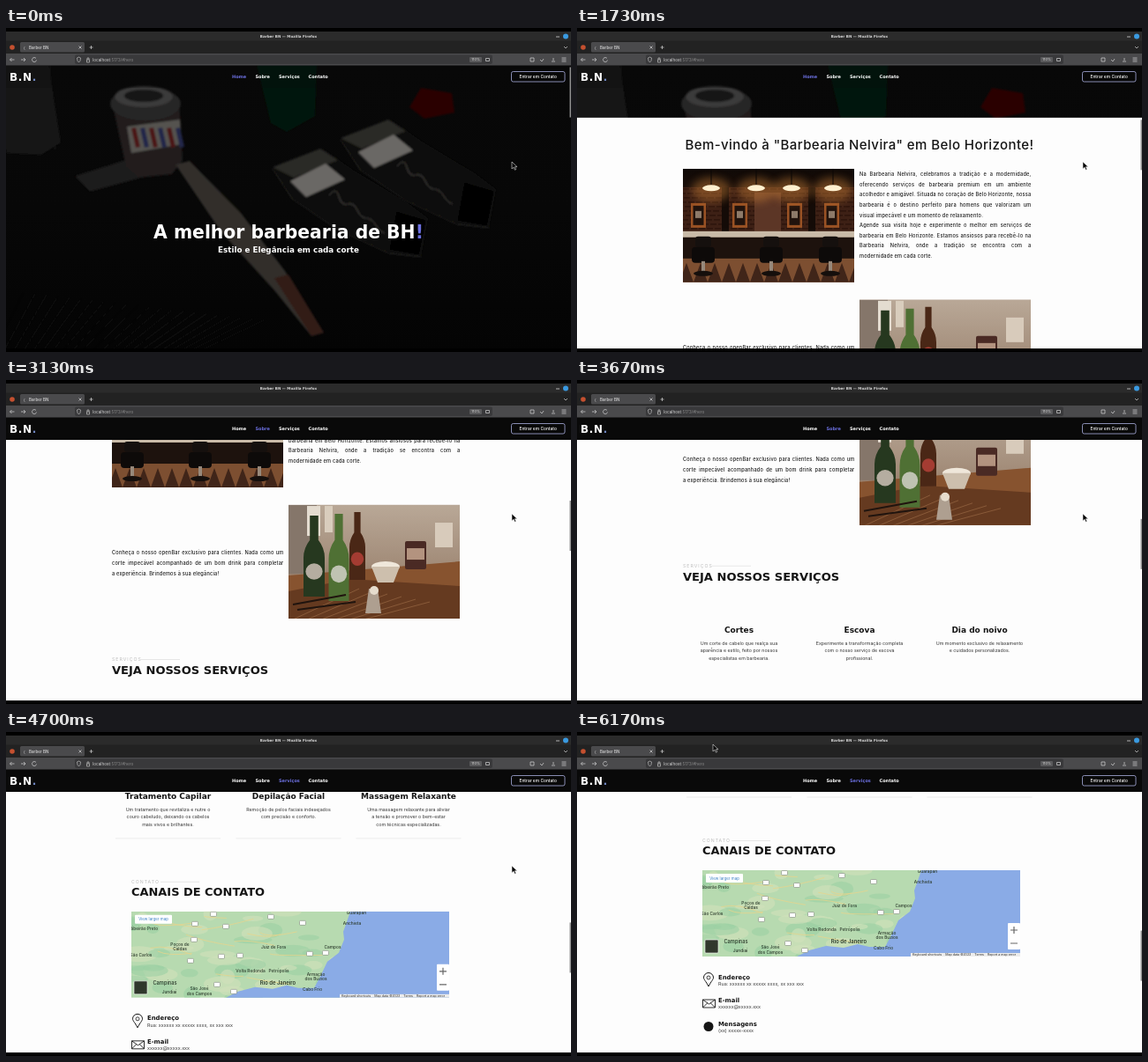
An HTML page that plays this animation: 640 px wide and 368 px high, repeating every 6.21 s.

```html
<!DOCTYPE html>
<html lang="pt">
<head>
<meta charset="utf-8">
<title>Barber BN</title>
<style>
html, body { margin: 0; width: 100%; height: 100%; overflow: hidden; background: #000; }
svg { display: block; width: 100vw; height: 100vh; }
text, .para { user-select: none; white-space: pre; }
.para { font: 500 5.6px/11.65px Inter, "Open Sans", sans-serif; letter-spacing: .22px; color: #1c1c1c; }
.para div { white-space: normal; height: 11.65px; }
.para .full { text-align: justify; text-align-last: justify; }
</style>
</head>
<body>
<svg id="stage" viewBox="0 0 640 368" preserveAspectRatio="none"></svg>
<script>
const LOOP = 6210;
const BOLD = '"DejaVu Sans", sans-serif', BODY = 'Inter, "Open Sans", sans-serif';
const INK = '#151515', WHITE = '#ffffff', BLUE = '#6c70e0', PAPER = '#fdfdfd';

// Markup helpers; text is placed by the vertical centre of its capitals.
const rect = (x, y, w, h, fill, more = '') =>
  `<rect x="${x}" y="${y}" width="${w}" height="${h}" fill="${fill}" ${more}/>`;
const circle = (x, y, r, fill, more = '') => `<circle cx="${x}" cy="${y}" r="${r}" fill="${fill}" ${more}/>`;
const oval = (x, y, rx, ry, fill, more = '') =>
  `<ellipse cx="${x}" cy="${y}" rx="${rx}" ry="${ry}" fill="${fill}" ${more}/>`;
const poly = (points, fill, more = '') => `<polygon points="${points}" fill="${fill}" ${more}/>`;
const line = (d, stroke, width = 1, more = '') =>
  `<path d="${d}" fill="none" stroke="${stroke}" stroke-width="${width}" ${more}/>`;
const text = (x, y, s, size, fill = INK, more = '') =>
  `<text x="${x}" y="${y + size * 0.365}" font-size="${size}" fill="${fill}" font-family='${BODY}' ${more}>${s}</text>`;
const bold = (x, y, s, size, fill = INK, more = '') =>
  `<text x="${x}" y="${y + size * 0.365}" font-size="${size}" fill="${fill}" font-weight="700" font-family='${BOLD}' ${more}>${s}</text>`;
const MID = 'text-anchor="middle"';
const range = (n, fn) => Array.from({ length: n }, (_, i) => fn(i)).join('');

function seeded(seed) {
  return () => (seed = (seed * 16807) % 2147483647) / 2147483647;
}

// Lines ending in "|" close a paragraph and stay unjustified.
function paragraph(x, firstCentre, lines) {
  const rows = lines.map(s => s.endsWith('|') ? `<div>${s.slice(0, -1)}</div>` : `<div class="full">${s}</div>`);
  return `<foreignObject x="${x}" y="${firstCentre - 6}" width="194.5" height="${lines.length * 11.65 + 2}">
    <div xmlns="http://www.w3.org/1999/xhtml" class="para">${rows.join('')}</div></foreignObject>`;
}

function clipper(x, y) {
  return `<g transform="translate(${x} ${y})" filter="url(#soft)">
    ${poly('0,14 58,-8 92,16 152,52 176,70 168,114 132,110 72,82 22,48', '#10100f')}
    ${poly('0,12 54,-9 74,4 24,24', '#2a2927')}
    ${poly('20,28 60,8 82,26 38,46', '#6a6865')}
    ${poly('140,62 174,72 166,112 132,106', '#060606')}
    ${line('M64 44 q8 -10 11 1 t10 9 t11 7 t10 9 t11 8 t10 9', '#3a3835', 1.2)}
    ${line('M0 14 L22 48 L72 82 L132 110 L168 114', '#242322')}</g>`;
}

function hero() {
  const comb = range(22, i => line(`M${i * 11 - 14} 368 l${34 + i * 2} ${-68 + i * 1.5}`, '#161616'));
  return rect(0, 42, 640, 326, 'url(#heroShade)') + `<g filter="url(#soft)">
    ${poly('0,42 48,42 62,130 40,144 0,142', '#161616')}
    ${range(8, i => line(`M${i * 7} 42 L${i * 8} 138`, '#1e1e1e'))}
    ${poly('284,42 352,42 350,100 318,118 300,108', '#04160a')}
    ${poly('470,68 505,74 508,96 474,103 457,90', '#2a0606')}
    ${poly('78,168 135,150 190,160 95,186', '#1b1a1a')}
    ${poly('120,84 196,80 200,150 188,166 150,170 136,158', '#201f1f')}
    ${oval(158, 86, 40, 19, '#262525')}${oval(156, 78, 33, 12, '#3b3a3a')}${oval(156, 77, 22, 7, '#181818')}
    ${poly('137,112 197,104 199,132 142,142', '#54524f')}
    ${range(6, i => poly(`${142 + i * 10},114 ${147 + i * 10},113 ${152 + i * 10},135 ${147 + i * 10},136`, i % 2 ? '#20264a' : '#4c1614'))}
    ${poly('192,155 208,151 266,210 316,276 360,346 346,350 304,298 244,232', '#312e2b')}
    ${poly('304,284 320,280 360,346 346,350', '#301b16')}
    ${comb}</g>${clipper(302, 146)}${clipper(379, 113)}`;
}

function barbershop() {
  const lamp = x => oval(x, 489, 22, 14, '#d98a3a', 'opacity=".4" filter="url(#glow)"') +
    line(`M${x} 465 V483`, '#0b0705') + oval(x, 487, 10, 3.5, '#fff0cf');
  const chair = x => rect(x - 9, 542, 18, 12, '#15100e', 'rx="3"') + rect(x - 13, 554, 26, 18, '#0d0a09', 'rx="4"') +
    rect(x - 2, 570, 4, 13, '#97897b') + oval(x, 584, 11, 3, '#150f0c');
  const bricks = range(10, i => line(`M120 ${488 + i * 5} h194`, '#2a120b', 1.2, `stroke-dasharray="7 2" stroke-dashoffset="${i * 4}"`));
  const mirror = x => rect(x, 504, 17, 28, '#9a5224') + rect(x + 2.5, 507, 12, 22, '#21130d') + rect(x + 5, 513, 7, 8, '#8d7a69');
  return `<g clip-path="url(#shopClip)">${rect(120, 465, 194, 129, 'url(#shopShade)')}
    ${rect(120, 486, 194, 52, '#3d2015')}${bricks}${rect(164, 486, 8, 52, '#140b07')}${rect(262, 486, 8, 52, '#140b07')}
    ${[129, 176, 238, 280].map(mirror).join('')}${rect(201, 492, 30, 44, '#5c3626')}
    ${rect(120, 536, 194, 7, '#c9bba8')}${rect(120, 543, 194, 24, '#1d120d')}
    ${rect(120, 567, 194, 27, '#7d4f31')}
    ${range(13, i => poly(`${116 + i * 16},594 ${124 + i * 16},572 ${132 + i * 16},594`, '#402519'))}
    ${[152, 203, 243, 290].map(lamp).join('')}${[143, 220, 287].map(chair).join('')}</g>`;
}

function drinks() {
  const bottle = (x, top, w, h, fill, label) =>
    `<path d="M${x - w / 5} ${top} h${w * 0.4} v${h * 0.3} q${w * 0.3} ${h * 0.1} ${w * 0.3} ${h * 0.22} v${h * 0.48} h${-w} v${-h * 0.48} q0 ${-h * 0.12} ${w * 0.3} ${-h * 0.22} z" fill="${fill}"/>` +
    oval(x, top + h * 0.69, w * 0.4, h * 0.1, label);
  return `<g clip-path="url(#drinkClip)">${rect(320, 613.5, 194, 130, 'url(#drinkShade)')}
    ${rect(320, 614, 32, 78, '#85766a')}${rect(486, 634, 20, 28, '#d8cbbb')}
    ${rect(341, 615, 15, 34, '#e4dcd0')}${rect(361, 615, 9, 30, '#d9cdbd')}
    ${poly('320,694 514,678 514,744 320,744', '#87532f')}
    ${poly('320,712 390,698 514,706 514,744 320,744', '#653a20')}
    ${range(6, i => line(`M${325 + i * 16} 744 l75 -${35 - i * 3}`, '#92633f', 0.8))}
    ${rect(452, 655, 24, 32, '#4a2a24', 'rx="2"')}${rect(454, 663, 20, 13, '#b3937f')}
    ${bottle(349, 626, 24, 92, '#26381f', '#b5ada0')}${bottle(398, 622, 18, 77, '#4a2716', '#a43c32')}
    ${bottle(377, 624, 23, 99, '#4f7034', '#bfc3b2')}
    ${oval(430, 684, 16, 6, '#efe7da')}${poly('414,684 446,684 439,702 421,702', '#cdbfad')}
    ${poly('411,709 421,709 425,737 407,737', '#ae9f90')}${circle(417, 711, 5, '#e6dccd')}
    ${line('M325 727 L385 716 M330 733 L396 724', '#20140e', 2)}</g>`;
}

const SERVICES = [
  ['Cortes', 'Um corte de cabelo que realça sua', 'aparência e estilo, feito por nossos', 'especialistas em barbearia.'],
  ['Escova', 'Experimente a transformação completa', 'com o nosso serviço de escova', 'profissional.'],
  ['Dia do noivo', 'Um momento exclusivo de relaxamento', 'e cuidados personalizados.'],
  ['Tratamento Capilar', 'Um tratamento que revitaliza e nutre o', 'couro cabeludo, deixando os cabelos', 'mais vivos e brilhantes.'],
  ['Depilação Facial', 'Remoção de pelos faciais indesejados', 'com precisão e conforto.'],
  ['Massagem Relaxante', 'Uma massagem relaxante para aliviar', 'a tensão e promover o bem-estar', 'com técnicas especializadas.'],
];

function services() {
  return SERVICES.map(([title, ...lines], i) => {
    const x = [183.5, 320, 456][i % 3], y = i < 3 ? 862 : 950;
    return bold(x, y, title, 9, INK, MID) +
      lines.map((s, j) => text(x, y + 15 + j * 8.6, s, 5.3, '#333333', MID)).join('') +
      (i < 3 ? '' : rect(x - 59.5, 997.5, 119, 1, '#ececec'));
  }).join('');
}

function map() {
  const rnd = seeded(77);
  const patches = range(45, () => oval(142 + rnd() * 240, 1081 + rnd() * 98, 6 + rnd() * 16, 3 + rnd() * 6,
    rnd() < 0.5 ? '#9bd0a4' : '#d2e2bb', 'opacity=".6"'));
  const roads = range(13, () => {
    const x = 142 + rnd() * 180, y = 1083 + rnd() * 78;
    return line(`M${x} ${y} q${rnd() * 30} ${rnd() * 20 - 10} ${25 + rnd() * 35} ${rnd() * 26 - 13}`, '#e6d58d', 0.8);
  });
  const badges = [[235, 1084], [300, 1087], [214, 1095], [249, 1098], [336, 1094], [213, 1113], [244, 1132],
    [265, 1131], [209, 1137], [344, 1129], [362, 1128], [239, 1164], [258, 1172]]
    .map(([x, y]) => rect(x - 3.5, y - 2.5, 7, 5, '#ffffff', 'rx="1" stroke="#7d8577" stroke-width=".6"')).join('');
  const towns = [[156, 1100, 'Ribeirão Preto'], [153, 1130, 'São Carlos'], [197, 1118, 'Poços de'], [197, 1123, 'Caldas'],
    [185, 1172, 'Jundiaí'], [219, 1168, 'São José'], [219, 1174, 'dos Campos'], [303, 1121, 'Juiz de Fora'],
    [277, 1148, 'Volta Redonda'], [309, 1148, 'Petrópolis'], [370, 1121, 'Campos'], [351, 1152, 'Armação'],
    [351, 1157, 'dos Búzios'], [347, 1169, 'Cabo Frio'], [392, 1094, 'Anchieta'], [397, 1082.5, 'Guarapari']]
    .map(([x, y, s]) => text(x, y, s, 4.8, '#2b3a2b', MID + ' font-weight="500"')).join('');
  return `<g clip-path="url(#mapClip)">${rect(142, 1081, 360, 98, '#b7dab0')}${patches}${roads}
    <path d="M390 1081 L386 1093 L382 1104 L383 1113 L377 1128 L364 1138 L355 1157 L349 1168 L331 1168 L318 1165 L302 1169 L282 1167 L263 1172 L247 1180 H502 V1081 Z" fill="#8aabe6"/>
    ${badges}${towns}${text(180, 1162, 'Campinas', 5.7, '#2b3a2b', MID + ' font-weight="500"')}
    ${text(308, 1162, 'Rio de Janeiro', 5.9, '#2b3a2b', MID + ' font-weight="600"')}
    ${rect(146, 1085, 42, 10, '#ffffff', 'rx="1"')}${text(167, 1090, 'View larger map', 4.4, '#3b80c4', MID)}
    ${rect(145, 1160, 15, 15, '#30382c', 'rx="1" stroke="#ffffff" stroke-width=".6"')}
    ${rect(488, 1141, 14, 30, '#ffffff', 'rx="1"')}${line('M491 1149 h8 M495 1145 v8 M491 1164 h8', '#666666', 1.2)}
    ${rect(378, 1175, 124, 4, '#ececec')}
    ${text(380, 1177, 'Keyboard shortcuts    Map data ©2023    Terms    Report a map error', 3.6, '#333333')}</g>`;
}

function contacts() {
  const entry = (y, title, detail) => bold(160, y, title, 6.9) + text(160, y + 8, detail, 5.4, '#383838');
  return entry(1202, 'Endereço', 'Rua: xxxxxx xx xxxxx xxxx, xx xxx xxx') +
    entry(1228.5, 'E-mail', 'xxxxxx@xxxxx.xxx') + entry(1255, 'Mensagens', '(xx) xxxxx-xxxx') +
    line('M149 1213 C146 1207 143.5 1205 143.5 1203 A5.5 5.5 0 0 1 154.5 1203 C154.5 1205 152 1207 149 1213 Z', INK) +
    circle(149, 1203, 2, 'none', `stroke="${INK}" stroke-width=".8"`) +
    line('M142.5 1228 h14 v9 h-14 z l7 5 l7 -5 M142.5 1237 l5 -5 M156.5 1237 l-5 -5', INK, 0.9) +
    circle(149, 1258.5, 5.5, INK);
}

const overline = (x, y, s) => text(x, y, s, 5.2, '#bdbdbd', 'letter-spacing="1"') +
  rect(x + 33, y, 44, 0.7, '#dddddd');

function page() {
  return rect(0, 407, 640, 1400, PAPER) +
    bold(320, 232, `A melhor barbearia de BH<tspan fill="${BLUE}">!</tspan>`, 20.35, WHITE, MID) +
    bold(320, 252, 'Estilo e Elegância em cada corte', 8.75, WHITE, MID) +
    text(320, 438, 'Bem-vindo à "Barbearia Nelvira" em Belo Horizonte!', 15, INK, MID + ' font-weight="500" letter-spacing=".42"') +
    barbershop() + drinks() +
    paragraph(320, 472, [
      'Na Barbearia Nelvira, celebramos a tradição e a modernidade,',
      'oferecendo serviços de barbearia premium em um ambiente',
      'acolhedor e amigável. Situada no coração de Belo Horizonte, nossa',
      'barbearia é o destino perfeito para homens que valorizam um',
      'visual impecável e um momento de relaxamento.|',
      'Agende sua visita hoje e experimente o melhor em serviços de',
      'barbearia em Belo Horizonte. Estamos ansiosos para recebê-lo na',
      'Barbearia Nelvira, onde a tradição se encontra com a',
      'modernidade em cada corte.|']) +
    paragraph(120, 669.3, [
      'Conheça o nosso openBar exclusivo para clientes. Nada como um',
      'corte impecável acompanhado de um bom drink para completar',
      'a experiência. Brindemos à sua elegância!|']) +
    overline(120, 789, 'SERVIÇOS') + bold(120, 801, 'VEJA NOSSOS SERVIÇOS', 13.05) + services() +
    overline(142, 1047, 'CONTATO') + bold(142, 1058.5, 'CANAIS DE CONTATO', 12.95) + map() + contacts();
}

function browser() {
  const pale = '#d4d4d4';
  return rect(0, 0, 640, 4, '#000') + rect(0, 364, 640, 4, '#000') +
    rect(0, 4, 640, 11, '#2b2b2b') + rect(0, 14.5, 640, 14.5, '#222222') + rect(0, 29, 640, 13.5, '#4a4a4c') +
    bold(320, 9.5, 'Barber BN — Mozilla Firefox', 4.1, pale, MID) +
    line('M623 10 h4', pale, 0.8) + circle(634, 9.5, 3, '#3a9ae0') +
    circle(7, 22, 2.8, '#c5502f') + rect(16, 16, 73, 11.5, '#4a4a4c', 'rx="1.5"') +
    text(20, 22, '(', 4.5, pale) + text(26, 22, 'Barber BN', 4.6, '#f0f0f0') +
    line('M82.5 20.5 l3 3 m0 -3 l-3 3 M94.5 22 h4 M96.5 20 v4 M632 21 l2 2 l2 -2', pale, 0.7) +
    rect(78, 30.5, 473, 10.5, '#39393b', 'rx="2"') +
    line('M9.5 36 h-5 l2 -2 m-2 2 l2 2 M17 36 h5 l-2 -2 m2 2 l-2 2 M34 34.5 a2.5 2.5 0 1 0 .5 2', pale, 0.7) +
    line('M80.5 34 l2 -1 l2 1 q0 4 -2 5 q-2 -1 -2 -5 z M91.5 36 h3 v3 h-3 z M92 36 v-2 h2 v2', pale, 0.6) +
    text(98, 36, 'localhost<tspan fill="#8a8a8a">:5173/#hero</tspan>', 4.7, pale) +
    rect(525, 33, 14, 6, '#5a5a5c', 'rx="1"') + text(532, 36, '110%', 4, pale, MID) +
    line('M543.5 34.5 h4 v3 h-4 z M594 34 h4 v4 h-4 z M605 36 l2 2 l2 -3 M618 38 h4 M620 34 v3 M629.5 34 h5 m-5 2 h5 m-5 2 h5', pale, 0.7);
}

const NAV = [['Home', 256], ['Sobre', 282.5], ['Serviços', 309], ['Contato', 342.5]];

const header = () => rect(0, 42, 640, 26, '#090909', 'id="bar"') +
  bold(4, 55.2, 'B.N<tspan fill="#6f86c0">.</tspan>', 12, WHITE, 'letter-spacing=".7"') +
  NAV.map(([s, x]) => bold(x, 55.2, s, 5, WHITE, 'class="nav"')).join('') +
  rect(572.5, 49.5, 60.5, 11.5, 'none', 'rx="2" stroke="#a9aede" stroke-width=".8"') +
  text(602.7, 55.2, 'Entrar em Contato', 4.9, WHITE, MID + ' font-weight="500"');

const shade = (id, ...stops) => `<linearGradient id="${id}" x1="0" y1="0" x2="0" y2="1">${stops.map((c, i) =>
  `<stop offset="${i / (stops.length - 1)}" stop-color="${c}"/>`).join('')}</linearGradient>`;
const clip = (id, x, y, w, h) => `<clipPath id="${id}">${rect(x, y, w, h, '#000')}</clipPath>`;
const blur = (id, amount) => `<filter id="${id}" x="-50%" y="-50%" width="200%" height="200%"><feGaussianBlur stdDeviation="${amount}"/></filter>`;

const stage = document.getElementById('stage');
stage.innerHTML = `<defs>${shade('heroShade', '#080808', '#070707', '#040404')}
  ${shade('shopShade', '#0f0906', '#2e1a11', '#4d3020')}${shade('drinkShade', '#b9a897', '#a38d7a', '#775640')}
  ${clip('view', 0, 42, 640, 322)}${clip('shopClip', 120, 465, 194, 129)}
  ${clip('drinkClip', 320, 613.5, 194, 129.5)}${clip('mapClip', 142, 1081, 360, 98)}
  ${blur('soft', 1)}${blur('glow', 5)}</defs>
  <g clip-path="url(#view)">${hero()}<g id="page">${page()}</g>${header()}
  <rect id="thumb" x="638.5" width="1.5" height="57" fill="#8c8c8c"/></g>${browser()}
  <path id="cursor" d="M0 0 V8 L2 6.2 L3.4 9.2 L4.7 8.6 L3.4 5.7 H6 Z" fill="#000" stroke="#e8e8e8" stroke-width=".6"/>`;

const $ = id => document.getElementById(id);
const parts = { page: $('page'), bar: $('bar'), thumb: $('thumb'), cursor: $('cursor') };
const links = [...document.querySelectorAll('.nav')];

const SCROLL = [[0, 0], [500, 0], [1200, 158], [1730, 305], [2630, 396], [3670, 578], [4700, 877], [5200, 924], [LOOP, 924]];
const slope = i => (SCROLL[i + 1][1] - SCROLL[i][1]) / (SCROLL[i + 1][0] - SCROLL[i][0]);

// Harmonic-mean tangents keep the scroll monotone.
function tangent(i) {
  if (i === 0 || i === SCROLL.length - 1) return 0;
  const a = slope(i - 1), b = slope(i);
  return a * b > 0 ? 2 * a * b / (a + b) : 0;
}

function scrollAt(t) {
  let i = 0;
  while (i < SCROLL.length - 2 && t >= SCROLL[i + 1][0]) i++;
  const [t0, y0] = SCROLL[i], [t1, y1] = SCROLL[i + 1];
  const h = t1 - t0, u = (t - t0) / h, v = 1 - u;
  return y0 * (1 + 2 * u) * v * v + y1 * u * u * (3 - 2 * u) + h * u * v * (tangent(i) * v - tangent(i + 1) * u);
}

function draw(t) {
  const y = scrollAt(t);
  parts.page.setAttribute('transform', `translate(0 ${-y})`);
  parts.bar.setAttribute('opacity', y > 350 ? 1 : 0.25);
  parts.thumb.setAttribute('y', 44.5 + y * 0.196);
  const active = y < 365 ? 0 : y < 740 ? 1 : 2;
  links.forEach((link, i) => link.setAttribute('fill', i === active ? BLUE : WHITE));
  const u = Math.min(1, Math.max(0, (t - 5350) / 780)), e = u * u * (3 - 2 * u);
  parts.cursor.setAttribute('transform', `translate(${573 - 419 * e} ${152 - 138 * e})`);
}

const start = performance.now();
function tick() {
  draw((performance.now() - start) % LOOP);
  requestAnimationFrame(tick);
}
tick();
</script>
</body>
</html>
```
